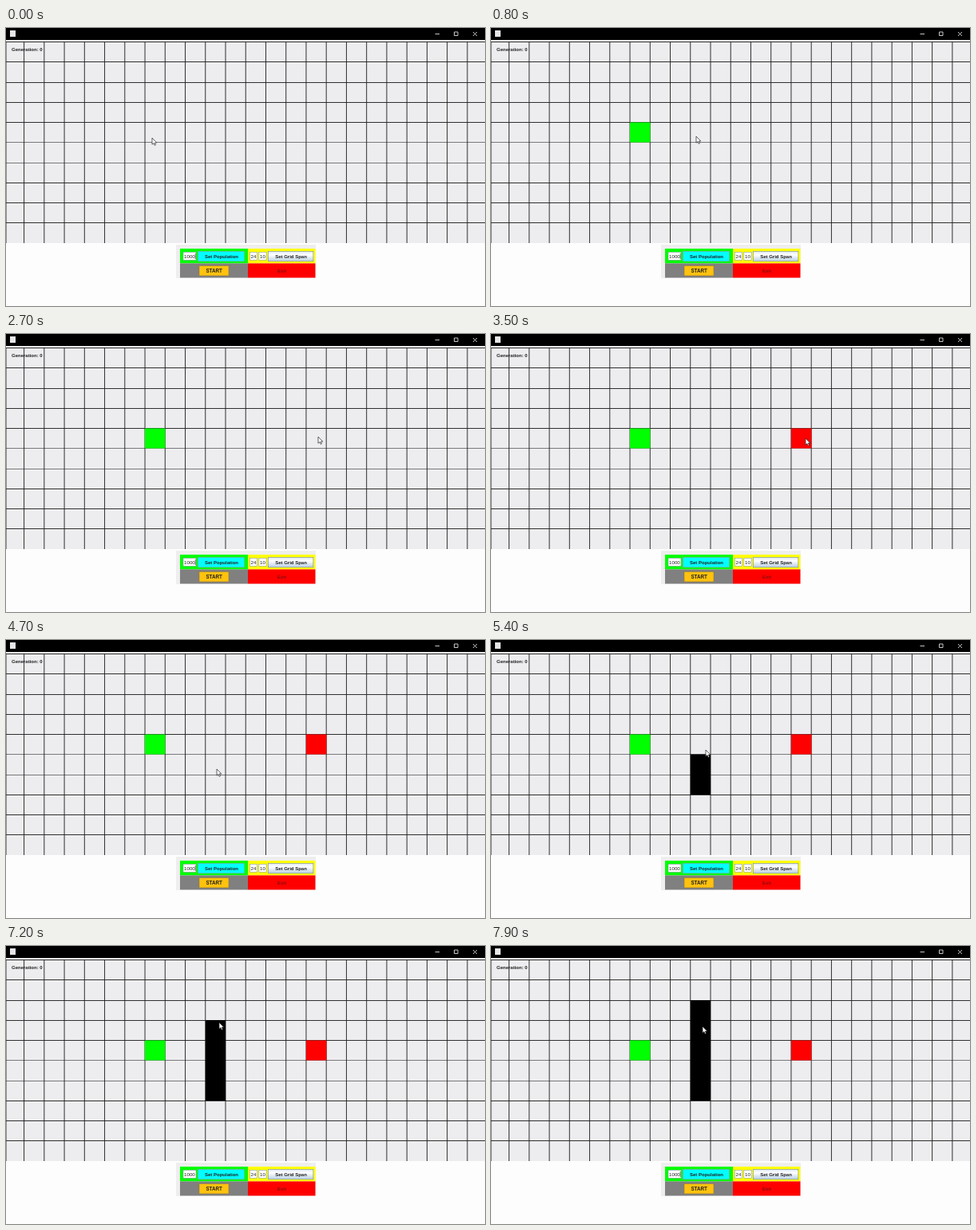
These frames come from a looping animation (600 px wide and 349 px high, 8000 ms). An HTML page:

```html
<!DOCTYPE html>
<html lang="en">
<head>
<meta charset="utf-8">
<title>Grid setup</title>
<style>
  html, body { margin: 0; width: 100%; height: 100%; overflow: hidden; background: #fdfdfd; }
  svg { display: block; width: 100%; height: 100%; }
  text { font: bold 6px "Liberation Sans", Arial, sans-serif; fill: #222; }
  .field { font-weight: normal; font-size: 6.2px; }
  .mid { text-anchor: middle; }
  .cell { animation: 8s step-end infinite; }
  #start { animation-name: at200; }
  #goal { animation-name: at3100; }
  #wall1 { animation-name: at4800; }
  #wall2 { animation-name: at5100; }
  #wall3 { animation-name: at5600; }
  #wall4 { animation-name: at6100; }
  #wall5 { animation-name: at7300; }
  @keyframes at200 { 0% { opacity: 0 } 2.5%, 100% { opacity: 1 } }
  @keyframes at3100 { 0% { opacity: 0 } 38.75%, 100% { opacity: 1 } }
  @keyframes at4800 { 0% { opacity: 0 } 60%, 100% { opacity: 1 } }
  @keyframes at5100 { 0% { opacity: 0 } 63.75%, 100% { opacity: 1 } }
  @keyframes at5600 { 0% { opacity: 0 } 70%, 100% { opacity: 1 } }
  @keyframes at6100 { 0% { opacity: 0 } 76.25%, 100% { opacity: 1 } }
  @keyframes at7300 { 0% { opacity: 0 } 91.25%, 100% { opacity: 1 } }

  #caret { animation: blink 1s step-end infinite; }
  @keyframes blink { 0% { opacity: 1 } 20% { opacity: 0 } 70%, 100% { opacity: 1 } }

  /* The pointer advances in 100 ms ticks and rests between moves. */
  #pointer { animation: move 8s step-end infinite; }
  @keyframes move {
    0% { transform: translate(183px, 138px) }
    3.75% { transform: translate(183px, 138px); animation-timing-function: steps(5) }
    10% { transform: translate(257px, 136px); animation-timing-function: steps(2) }
    12.5% { transform: translate(275px, 144px); animation-timing-function: steps(6) }
    20% { transform: translate(401px, 148px) }
    25% { transform: translate(382px, 127px); animation-timing-function: steps(2) }
    27.5% { transform: translate(387px, 122px); animation-timing-function: steps(2) }
    30% { transform: translate(389px, 127px) }
    32.5% { transform: translate(390px, 128px); animation-timing-function: steps(2) }
    35% { transform: translate(392px, 130px) }
    38.75% { transform: translate(393px, 131px) }
    41.25% { transform: translate(394px, 131px) }
    43.75% { transform: translate(394px, 131px); animation-timing-function: steps(8) }
    53.75% { transform: translate(262px, 168px); animation-timing-function: steps(4) }
    58.75% { transform: translate(264px, 162px); animation-timing-function: steps(1) }
    60% { transform: translate(264px, 171px); animation-timing-function: steps(3) }
    63.75% { transform: translate(266px, 155px); animation-timing-function: steps(1) }
    65% { transform: translate(268px, 145px) }
    67.5% { transform: translate(269px, 138px); animation-timing-function: steps(5) }
    73.75% { transform: translate(271px, 117px); animation-timing-function: steps(3) }
    77.5% { transform: translate(267px, 99px) }
    90% { transform: translate(267px, 96px); animation-timing-function: steps(3) }
    93.75% { transform: translate(265px, 87px) }
    98.75%, 100% { transform: translate(265px, 101px) }
  }
</style>
</head>
<body>
<svg viewBox="0 0 600 349" preserveAspectRatio="none">
  <defs>
    <linearGradient id="metal" x2="0" y2="1">
      <stop stop-color="#dde8f3"/>
      <stop offset=".35" stop-color="#fff"/>
      <stop offset="1" stop-color="#b8cfe5"/>
    </linearGradient>
  </defs>

  <rect width="600" height="349" fill="#fdfdfd"/>
  <rect y="14" width="600" height="256" fill="#edecee"/>
  <rect width="600" height="15" fill="#000"/>
  <rect x="5" y="3" width="7" height="8" fill="#e6e6e8"/>
  <path d="M537.5 7.5h5.5M561.5 5h4.5v4.5h-4.5zM585 5l5 5m0-5l-5 5" fill="none" stroke="#ddd" stroke-width=".9"/>

  <g id="grid" stroke="#1c1c1c"></g>
  <text x="7" y="29">Generation: 0</text>

  <rect id="start" class="cell" x="174" y="118.5" width="25.5" height="25" fill="#0f0"/>
  <rect id="goal" class="cell" x="376" y="118.5" width="25.5" height="25" fill="#f00"/>
  <g>
    <rect id="wall1" class="cell" x="250" y="169" width="25" height="25"/>
    <rect id="wall2" class="cell" x="250" y="143.5" width="25" height="26"/>
    <rect id="wall3" class="cell" x="250" y="118.5" width="25" height="25.5"/>
    <rect id="wall4" class="cell" x="250" y="93" width="25" height="26"/>
    <rect id="wall5" class="cell" x="250" y="68" width="25" height="25.5"/>
  </g>

  <rect x="213" y="272" width="175" height="42" fill="#eee"/>
  <rect x="218" y="277" width="85" height="18.5" fill="#0f0"/>
  <rect x="303" y="277" width="84.5" height="18.5" fill="#ff0"/>
  <rect x="218" y="295.5" width="85" height="18" fill="#808080"/>
  <rect x="303" y="295.5" width="84.5" height="18" fill="#f00"/>

  <g fill="#fff" stroke="#8a9aa8" stroke-width=".6">
    <rect x="222" y="281.3" width="16" height="10"/>
    <rect x="305.3" y="281.3" width="9.4" height="10"/>
    <rect x="316.8" y="281.3" width="9.4" height="10"/>
    <rect x="240.3" y="280.3" width="58.4" height="12.6" fill="#0ff"/>
    <rect x="328.3" y="280.3" width="56.6" height="12.6" fill="url(#metal)" stroke="#7a8a99"/>
    <rect x="242" y="298.5" width="37" height="12.5" fill="#ffc20e" stroke="#8c7a40"/>
  </g>

  <text class="field" x="223" y="289">1000</text>
  <rect id="caret" x="236.8" y="283" width=".6" height="7" fill="#222"/>
  <text class="field mid" x="310" y="289">24</text>
  <text class="field mid" x="321.5" y="289">10</text>
  <text class="mid" x="270" y="289">Set Population</text>
  <text class="mid" x="357" y="289">Set Grid Span</text>
  <text class="mid" x="260.7" y="307" style="font-size:6.3px">START</text>
  <text class="mid" x="345.5" y="307" style="fill:#8c0d0d">Exit</text>

  <path id="pointer" d="M0 0V8.2L1.9 6.5L3.1 9.3L4.5 8.7L3.3 6H5.8Z" fill="#fff" stroke="#222" stroke-width=".7"/>
</svg>
<script>
  const grid = document.getElementById("grid");

  function addLine(x1, y1, x2, y2, opacity) {
    const line = document.createElementNS(grid.namespaceURI, "line");
    Object.entries({ x1, y1, x2, y2, opacity }).forEach(([key, value]) => line.setAttribute(key, value));
    grid.append(line);
  }

  for (let col = -1; col < 23; col++) {
    const x = Math.max(0, 22.6 + 25.24 * col);
    addLine(x, 17, x, 270, 0.9);
  }
  for (let row = 0; row < 10; row++) {
    const y = Math.round(17.25 + 25.22 * row) + 0.5;
    addLine(0, y, 600, y, row === 5 || row === 6 ? 0.55 : 0.9);
  }
</script>
</body>
</html>
```
